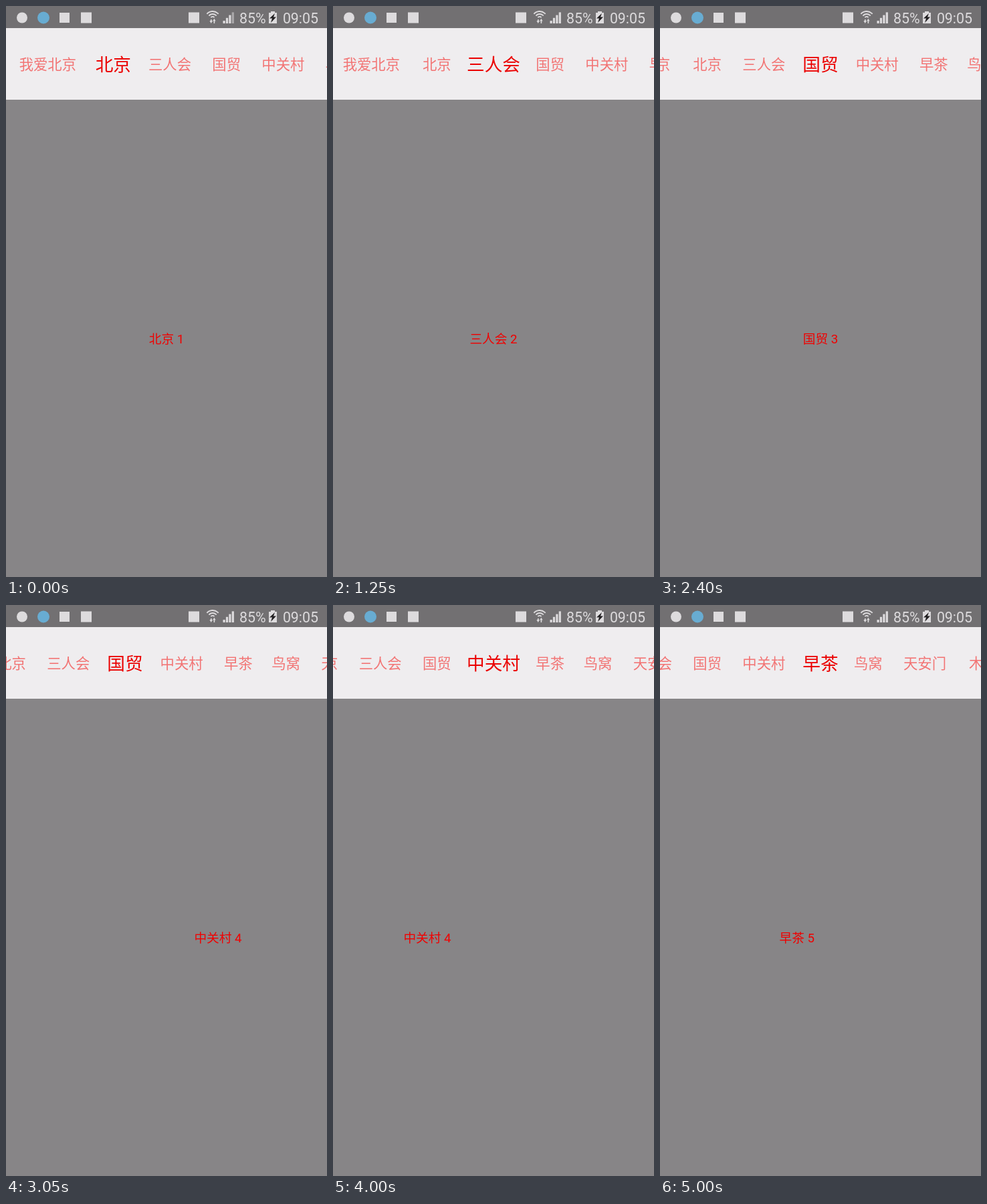
These frames come from a looping animation (480x853 px, 5.05 s). An HTML page with a canvas:

```html
<!DOCTYPE html>
<html lang="zh-CN">
<head>
<meta charset="utf-8">
<title>Tab pager</title>
<style>
  html, body { margin: 0; width: 100%; height: 100%; overflow: hidden; background: #878587; }
  canvas { display: block; width: 480px; height: 853px; }
</style>
</head>
<body>
<canvas id="stage" width="480" height="853"></canvas>
<script>
const ctx = document.getElementById('stage').getContext('2d');
const WIDTH = 480, HEIGHT = 853, LOOP = 5050, STEP = 50;
const FONT = 'Roboto, "Noto Sans CJK SC", "Noto Sans CJK", sans-serif';
const ICON = '#dddbdd';

const STATUS_HEIGHT = 33, HEADER_BOTTOM = 140;
const TAB_MIDDLE = 86.67, PAGE_MIDDLE = 496.67;
const BASELINE = 0.392; // from the middle of a line, in ems
const LARGE = 80 / 3, SMALL = LARGE * 0.8, TAB_PADDING = 18;

const titles = ['我爱北京', '北京', '三人会', '国贸', '中关村', '早茶', '鸟窝', '天安门', '木工坊'];
let right = 0;
const tabs = titles.map(title => {
  const width = title.length * LARGE + TAB_PADDING;
  right += width;
  return { title, center: right - width / 2 };
});

// Each swipe drags the page, then settles after the finger lifts.
const swipes = [
  { start: 700, release: 800, drag: 104 },
  { start: 1800, release: 1912, drag: 71 },
  { start: 2850, release: 2946, drag: 133 },
  { start: 3900, release: 4000, drag: 99 },
  { start: 4950, release: 5050, drag: 101 }
];
const SETTLE = 400, TAB_SCROLL = 215;

const clamp = v => Math.max(0, Math.min(1, v));
const easeOut = (v, power) => 1 - (1 - clamp(v)) ** power;
const scrollFor = tab => Math.max(0, tabs[tab].center - WIDTH / 2);

function swipeOffset(t, { start, release, drag }) {
  const begin = start - STEP;
  const dragged = drag * clamp((t - begin) / (release - begin)) ** 2.6;
  return dragged + (WIDTH - drag) * easeOut((t - release) / SETTLE, 5);
}

function stateAt(t) {
  const state = { page: WIDTH, tabScroll: 0, selected: 1 };
  swipes.forEach((swipe, i) => {
    const sinceRelease = t - swipe.release;
    state.page += swipeOffset(t, swipe);
    state.tabScroll += (scrollFor(i + 2) - scrollFor(i + 1)) * easeOut(sinceRelease / TAB_SCROLL, 2);
    if (sinceRelease >= SETTLE) state.selected = i + 2;
  });
  return state;
}

function rect(x, y, w, h, color) {
  ctx.fillStyle = color;
  ctx.fillRect(x, y, w, h);
}

function dot(x, y, r, color) {
  ctx.fillStyle = color;
  ctx.beginPath();
  ctx.arc(x, y, r, 0, Math.PI * 2);
  ctx.fill();
}

function polygon(points, color) {
  ctx.fillStyle = color;
  ctx.beginPath();
  points.forEach(([x, y]) => ctx.lineTo(x, y));
  ctx.fill();
}

function text(value, x, y, size, color, align = 'center', weight = 400) {
  ctx.font = `${weight} ${size}px ${FONT}`;
  ctx.textAlign = align;
  ctx.fillStyle = color;
  ctx.fillText(value, x, y);
}

function drawWifi() {
  ctx.strokeStyle = ICON;
  ctx.lineWidth = 1.9;
  for (const r of [3.5, 7.5, 11.5]) {
    ctx.beginPath();
    ctx.arc(309, 19.5, r, -Math.PI * 0.77, -Math.PI * 0.23);
    ctx.stroke();
  }
  rect(306, 20, 1.6, 3, ICON);
  polygon([[304.4, 22], [309, 22], [306.7, 26]], ICON);
  rect(310.6, 22, 1.6, 4, ICON);
  polygon([[309.2, 22.5], [313.6, 22.5], [311.4, 18.8]], ICON);
}

function drawBattery() {
  rect(396, 8, 6, 2, ICON);
  rect(393, 10, 12, 16, ICON);
  polygon([[402, 11], [394, 18.5], [398, 18.5], [396, 25], [404, 16.5], [400, 16.5]], '#222022');
}

function drawStatusBar(t) {
  rect(0, 0, WIDTH, STATUS_HEIGHT, '#727072');
  dot(24, 17.5, 8, ICON);
  dot(56, 17.5, 9, '#68acd2');
  rect(80, 10, 15, 15, ICON);
  rect(112, 9.5, 16, 16, ICON);
  rect(273, 9.5, 16, 16, ICON);
  drawWifi();
  for (let i = 0; i < 4; i++) {
    const h = 4 + i * 4.2;
    rect(324.5 + i * 4.4, 26 - h, 3.2, h, i === 3 && t < 350 ? '#aaa8aa' : ICON);
  }
  text('85%', 349, 25.5, 64 / 3, ICON, 'left');
  drawBattery();
  text('09:05', 467, 25.5, 64 / 3, ICON, 'right');
}

function drawTabs({ tabScroll, selected }) {
  rect(0, STATUS_HEIGHT, WIDTH, HEADER_BOTTOM - STATUS_HEIGHT, '#efedef');
  tabs.forEach(({ title, center }, i) => {
    const [size, color, weight] = i === selected ? [LARGE, '#eb0000', 500] : [SMALL, '#f27474', 400];
    text(title, center - tabScroll, TAB_MIDDLE + size * BASELINE, size, color, 'center', weight);
  });
}

function drawPages({ page }) {
  const size = 56 / 3;
  rect(0, HEADER_BOTTOM, WIDTH, HEIGHT - HEADER_BOTTOM, '#878587');
  titles.forEach((title, i) => {
    const x = WIDTH * (i + 0.5) - page;
    text(`${title} ${i}`, x, PAGE_MIDDLE + size * BASELINE, size, '#f00000');
  });
}

function frame(now) {
  const t = Math.floor((now % LOOP) / STEP) * STEP;
  const state = stateAt(t);
  drawPages(state);
  drawTabs(state);
  drawStatusBar(t);
  requestAnimationFrame(frame);
}
requestAnimationFrame(frame);
</script>
</body>
</html>
```
